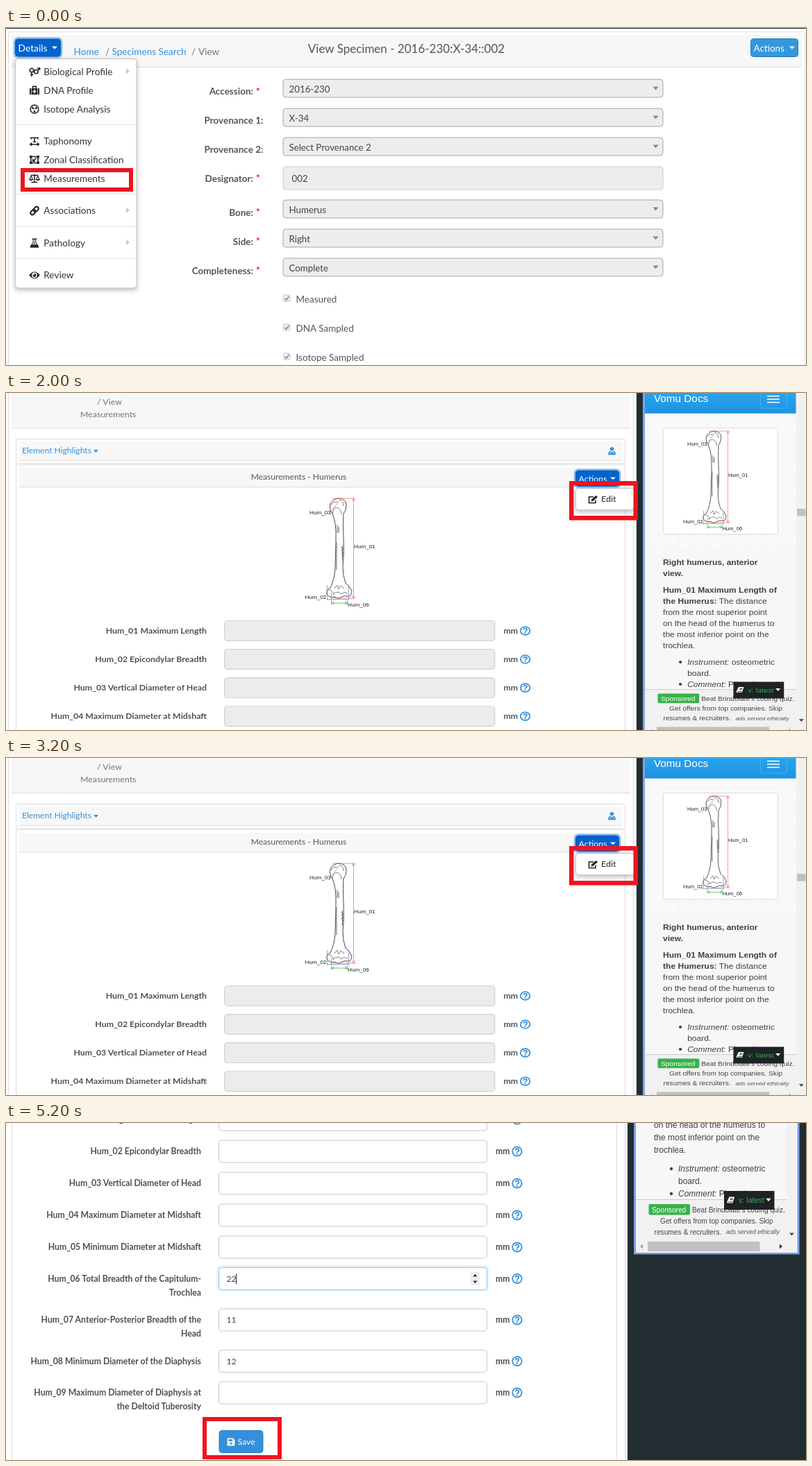
An HTML page for the animation above (6000 ms loop, 1152 by 486 pixels).

```html
<!DOCTYPE html>
<html lang="en">
<head>
<meta charset="utf-8">
<title>Specimen measurements</title>
<style>
  html, body { margin: 0; width: 100%; height: 100%; overflow: hidden; background: #fff; }
  svg { display: block; width: 1152px; height: 486px; font-family: Lato, sans-serif; }
  text { white-space: pre; }
  .arial { font-family: "Liberation Sans", Arial, sans-serif; }
</style>
</head>
<body>
<svg id="stage" viewBox="0 0 1152 486"></svg>
<script>
const BLUE = '#3490dc', ACTIVE = '#0062cc', RED = '#ed1520', GREY = '#6c757d', INK = '#212529', LINE = '#dcdcdc';
const HEAD = '#f7f7f7';

let squash = 1; // vertical text scale of the scene being built

// Text is placed by the middle of its capitals.
function text(x, y, s, { size = 13.6, fill = '#444', bold, anchor = 'start', italic } = {}) {
  return `<text transform="translate(${x} ${y + size * .355 * squash}) scale(1 ${squash})" font-size="${size}" fill="${fill}"
    text-anchor="${anchor}"${bold ? ' font-weight="700"' : ''}${italic ? ' font-style="italic"' : ''}>${s}</text>`;
}
const rect = (x, y, w, h, fill, stroke = 'none', r = 0, sw = 1) =>
  `<rect x="${x}" y="${y}" width="${w}" height="${h}" rx="${r}" fill="${fill}" stroke="${stroke}" stroke-width="${sw}"/>`;
const path = (d, stroke, sw = 1, fill = 'none') =>
  `<path d="${d}" stroke="${stroke}" stroke-width="${sw}" fill="${fill}"/>`;
const group = (transform, body, attrs = '') => `<g transform="${transform}" ${attrs}>${body}</g>`;
const down = (x, y, w, h, fill) => path(`M${x - w / 2} ${y - h / 2}h${w}l${-w / 2} ${h}z`, 'none', 0, fill);
const right = (x, y, w, h, fill) => path(`M${x - w / 2} ${y - h / 2}v${h}l${w} ${-h / 2}z`, 'none', 0, fill);
const highlight = (x, y, w, h, sw) => rect(x + sw / 2, y + sw / 2, w - sw, h - sw, 'none', RED, 0, sw);
const shadowBox = (x, y, w, h) =>
  rect(x - 1, y + 1, w + 2, h + 3, 'rgba(0,0,0,.22)', 'none', 5).replace('/>', ' filter="url(#soft)"/>') +
  rect(x, y, w, h, '#fff', '#c4c4c4', 4);

function button(x, y, w, h, label, size, active) {
  const ring = active ? rect(x - 1, y - 1, w + 2, h + 2, 'none', '#8dbcee', 5, 2.5) : '';
  return ring + rect(x + .5, y + .5, w - 1, h - 1, active ? ACTIVE : '#3498db', active ? '#005cbf' : '#2680bf', 4) +
    text(x + 4.5, y + h / 2 + .3, label, { size, fill: '#fff' }) + down(x + w - 9, y + h / 2, 8, 4 * squash, '#fff');
}

const solid = 'fill="currentColor" stroke="none"';
const icons = {
  sexes: '<circle cx="-4" cy="-2" r="2.7"/><circle cx="2.4" cy="0" r="2.7"/><path d="M-4 1v6M-6.3 4.3h4.6M4.3 -2l3 -3M4.3 -5.2h3.2v3.2"/>',
  medkit: `<path ${solid} d="M-7 -3h2v9h-2zM5 -3h2v9h-2zM-4.3 -3h8.6v9h-8.6z"/><path d="M-2.5 -3v-2.6h5v2.6"/><path stroke="#fff" d="M0 -1.2v5.4M-2.7 1.5h5.4"/>`,
  atom: `<circle r="5.9" stroke-width="1.5"/><path ${solid} d="M0 0l-4.6 -.5l2 -3.6zM0 0l4.6 -.5l-2 -3.6zM0 1l2 3.6h-4z"/>`,
  textWidth: '<path d="M-5 -3v-2.2h10v2.2M0 -5v5.5M-2 .7h4M-6 4.2h12M-4 2.2l-2.3 2l2.3 2M4 2.2l2.3 2l-2.3 2"/>',
  region: `<path d="M-5 -4.5h10v9h-10zM-2.5 2.5l5 -5"/><path ${solid} d="M-7 -6h3.5v3.5h-3.5zM3.5 -6h3.5v3.5h-3.5zM-7 2.5h3.5v3.5h-3.5zM3.5 2.5h3.5v3.5h-3.5zM-3 3v-5l5 5z"/>`,
  scales: `<path d="M0 -6v11.5M-4.5 5.6h9M-5.5 -4.5h11" stroke-width="1.5"/><path d="M-7.2 1.5l2.4 -5l2.4 5zM2.4 1.5l2.4 -5l2.4 5z" stroke-width="1.1"/><path ${solid} d="M-8 1.3h6.4q-3.2 4 -6.4 0zM1.6 1.3h6.4q-3.2 4 -6.4 0z"/>`,
  link: '<g transform="rotate(-45)" stroke-width="2"><rect x="-7" y="-2.6" width="8" height="5.2" rx="2.6"/><rect x="-1" y="-2.6" width="8" height="5.2" rx="2.6"/></g>',
  flask: `<path ${solid} d="M-3.4 -6.6h6.8v1.6h-1v4l3.7 5.8q.8 2 -1.2 2h-9.8q-2 0 -1.2 -2l3.7 -5.8v-4h-1z"/><path stroke="#fff" stroke-width="1.1" d="M-.9 -5v4.4l-1.4 2.3h4.6l-1.4 -2.3v-4.4"/>`,
  eye: `<path ${solid} d="M-7.7 0q7.7 -10 15.4 0q-7.7 10 -15.4 0z"/><circle r="3.2" stroke="#fff" stroke-width="1.4"/><circle cx="-1" cy="-1" r="1" fill="#fff" stroke="none"/>`,
  edit: `<path d="M1 -4h-6.5v9.5h9.5v-4.5"/><path ${solid} d="M-2.5 3l.6 -3l6.5 -6.3l2.4 2.4l-6.5 6.3z"/>`,
  doctor: `<circle cy="-3.4" r="3" ${solid}/><path ${solid} d="M-5.5 6.5v-3q.5 -3 3.5 -3.2l2 2l2 -2q3 .2 3.5 3.2v3z"/><path stroke="#fff" stroke-width="1" d="M-2.5 2v3M2.5 2v2.5"/>`,
  save: `<path ${solid} d="M-6 -6h9l3 3v9h-12z"/><path stroke="none" fill="${BLUE}" d="M-4 -4.3h6.5v3h-6.5z"/><circle cy="2.4" r="1.8" stroke="none" fill="${BLUE}"/>`,
  book: `<path ${solid} d="M-2.5 -5h7.5l-2.6 9h-7.4q-1 -1 -.6 -2z"/><path stroke="#1f2226" stroke-width="1" d="M-1 -2.6h4M-1.6 -.8h4M-4 2.5h6.4"/>`
};
const icon = (name, x, y, color = INK, k = 1) =>
  group(`translate(${x} ${y}) scale(${k} ${k * squash})`, icons[name], `color="${color}" fill="none" stroke="currentColor" stroke-width="1.6"`);

function detailsScene() {
  squash = 1;
  const menu = [
    ['sexes', 'Biological Profile', 63, 1], ['medkit', 'DNA Profile', 90], ['atom', 'Isotope Analysis', 117],
    ['textWidth', 'Taphonomy', 163.5], ['region', 'Zonal Classification', 190], ['scales', 'Measurements', 217],
    ['link', 'Associations', 263.5, 1], ['flask', 'Pathology', 310, 1], ['eye', 'Review', 356.5]
  ];
  const fields = [
    ['Accession:', '2016-230', 87, 1], ['Provenance 1:', 'X-34', 129], ['Provenance 2:', 'Select Provenance 2', 171],
    ['Designator:', '002', 216.5, 1], ['Bone:', 'Humerus', 261, 1], ['Side:', 'Right', 303, 1], ['Completeness:', 'Complete', 345, 1]
  ];
  let s = rect(0, 0, 1152, 486, '#fff') + rect(0, 0, 1152, 1, '#22262b') +
    rect(3.5, 5.5, 1147, 500, '#fff', LINE, 3) + rect(8, 10, 1138, 46, HEAD) + rect(8, 56, 1138, 1, LINE) +
    text(97.5, 34, 'Home', { fill: BLUE }) + text(143, 34, '/', { fill: GREY }) +
    text(152.5, 34, 'Specimens Search', { fill: BLUE }) + text(267, 34, '/', { fill: GREY }) +
    text(277, 34, 'View', { fill: GREY }) +
    text(576.5, 29.8, 'View Specimen - 2016-230:X-34::002', { size: 17, fill: '#555', anchor: 'middle' }) +
    button(1072, 15, 69, 27, 'Actions', 13.4);

  for (const [label, value, y, required] of fields) {
    const plain = label === 'Designator:', h = plain ? 33 : 26;
    s += text(required ? 356 : 370.5, plain ? 217 : y + (y > 250 ? 5 : 4), label, { size: 13.5, fill: '#555', bold: 1, anchor: 'end' }) +
      (required ? text(360, y + (plain ? 0 : 4.5), '*', { fill: '#f00', bold: 1 }) : '') +
      rect(399, y - h / 2, 547, h, '#ededed', plain ? '#ccc' : '#a6a6a6', 4) +
      text(plain ? 411.5 : 407.5, y + 1, value, { size: 13.3 }) + (plain ? '' : down(935.5, y, 8, 5, '#888'));
  }
  ['Measured', 'DNA Sampled', 'Isotope Sampled'].forEach((label, i) => {
    const y = 390 + i * 42;
    s += rect(399.5, y - 5, 9.5, 9.5, '#efefef', '#c6c6c6', 1.5) + path(`M401.5 ${y}l2 2.2l4 -5`, '#8c8c8c', 1.8) +
      text(417.5, y + 1.7, label, { size: 13.5, fill: '#555' });
  });

  s += shadowBox(13.5, 44.5, 174.5, 330.5) + button(13, 15.5, 66, 26, 'Details', 13.8, true);
  for (const y of [139, 239, 286, 332]) s += rect(14, y, 174, 1, '#e4e6e8');
  for (const [name, label, y, more] of menu)
    s += icon(name, 41, y) + text(54.3, y, label, { fill: '#333' }) + (more ? right(175.5, y - .8, 5, 9, '#ccc') : '');
  return s + highlight(21, 202, 162, 34, 6);
}

// Measurement rows, shared by the two form scenes.
const rows = [
  [-5, 'Hum_01 Maximum Length'], [41, 'Hum_02 Epicondylar Breadth'], [87, 'Hum_03 Vertical Diameter of Head'],
  [133, 'Hum_04 Maximum Diameter at Midshaft'], [179, 'Hum_05 Minimum Diameter at Midshaft'],
  [224.5, 'Hum_06 Total Breadth of the Capitulum-', 'Trochlea', 22],
  [284, 'Hum_07 Anterior-Posterior Breadth of the', 'Head', 11],
  [343.5, 'Hum_08 Minimum Diameter of the Diaphysis', '', 12],
  [389, 'Hum_09 Maximum Diameter of Diaphysis at', 'the Deltoid Tuberosity']
];
function form(editing) {
  const label = { size: 12.25, fill: '#4c5157', bold: 1, anchor: 'end' };
  return rows.map(([y, first, second, value]) => {
    const focused = editing && value === 22;
    return text(281, y, first, label) + (second ? text(281, y + 20, second, label) : '') +
      (focused ? rect(305, y - 18, 389, 35, 'none', '#e4f2fb', 5, 3) : '') +
      rect(306.5, y - 16, 386, 32, editing ? '#fff' : '#ececec', focused ? '#8ec6ea' : '#c8c8c8', 4) +
      (editing && value ? text(317.5, y, value, { size: 12.25 }) : '') +
      (focused ? rect(331, y - 7, 1, 15, '#222') + rect(669, y - 10, 13, 20, '#efefef') +
        down(675.5, y + 5, 6, 4, '#333') + path(`M672.5 ${y - 3}h6l-3 -4z`, 'none', 0, '#333') : '') +
      text(705, y, 'mm', { size: 12.25, fill: '#4c5157', bold: 1 }) +
      `<circle cx="736" cy="${y}" r="6.7" fill="none" stroke="${BLUE}" stroke-width="1.8"/>` +
      path(`M733.7 ${y - 1.6}q.3 -2.2 2.4 -2.2q2.300 .1 2.300 2q0 1.300 -1.500 2q-.9 .5 -.9 1.500`, BLUE, 1.8) +
      `<circle cx="736" cy="${y + 3.7}" r="1.15" fill="${BLUE}"/>`;
  }).join('');
}

// Help window at the right with its advert and scroll bars.
function helpPanel() {
  const body = (x, y, s, o) => text(x, y, s, { size: 12, fill: '#404040', ...o });
  const strong = s => `<tspan font-weight="700">${s}</tspan>`, em = s => `<tspan font-style="italic">${s}</tspan>`;
  const lines = [
    [-96, strong('Right humerus, anterior')], [-78, strong('view.')], [-51, strong('Hum_01 Maximum Length of')],
    [-33, strong('the Humerus:') + ' The distance'], [-15, 'from the most superior point'],
    [3, 'on the head of the humerus to'], [21, 'the most inferior point on the'], [39, 'trochlea.']
  ];
  const ad = { size: 10.2, fill: '#444' };
  return rect(895, -400, 300, 1000, '#222d32') + rect(905.5, -400, 235.5, 588, '#f7f7f7', '#7c9fe6', 0, 3) +
    lines.map(([y, s]) => body(933, y, s)).join('') +
    [66, 102].map(y => `<circle cx="958" cy="${y}" r="2.2" fill="#404040"/>`).join('') +
    body(968, 66, em('Instrument:') + ' osteometric') + body(968, 84, 'board.') + body(968, 102, em('Comment:') + ' Place the') +
    rect(907, 110, 217, 59, '#f1f1f1') + rect(907, 110, 217, 1, '#c9c9c9') +
    rect(925.5, 117, 59.5, 15.5, '#37b24a', 'none', 2) + text(930, 125, 'Sponsored', { ...ad, fill: '#fff' }) +
    text(988, 125, "Beat Brindolate's coding quiz.", ad) + text(942, 141, 'Get offers from top companies. Skip', ad) +
    text(933.5, 157, 'resumes &amp; recruiters.', ad) + text(1037, 157, 'ads served ethically', { size: 8.75, fill: '#555', italic: 1 }) +
    rect(1034, 98, 72.5, 27, '#1f2226') + icon('book', 1044, 111.5, '#fff') +
    text(1055, 111.5, 'v: latest', { size: 10.7, fill: '#2fae4e' }) + down(1098, 111, 7, 4.5, '#fff') +
    rect(1124, -400, 15, 569, '#f1f1f1') + down(1131.5, 160.5, 7, 4, '#444') +
    rect(907, 169, 232, 18, '#f1f1f1') + rect(924, 171, 161.5, 14, '#c1c1c1') +
    right(1116, 178, 4, 7, '#333') + path('M917 174.5v7l-4 -3.5z', 'none', 0, '#a3a3a3');
}

function bone() {
  const name = (x, y, s) => text(x, y, s, { size: 8.2, fill: '#222' });
  return path('M470 174q-5 -6 -3 -14q4 -8 13 -8q10 1 10 10q0 7 -4 12q-1 14 0 34q1 26 -1 42q0 14 4 24q7 5 9 12q-1 8 -6 7q-5 -1 -8 1q-6 4 -10 0q-8 2 -12 -4q-1 -7 5 -9q6 -12 7 -28l1 -40q1 -26 -5 -39z', '#333', .9, '#fff') +
    path('M470 174q1 -9 7 -9q6 3 6 10M468 161q4 -5 9 -4M480 154q6 2 6 9M464 284q6 -1 8 7M473 282l4 -5l2 6l3 -5l5 4M471 290q7 -6 12 0q5 -5 9 0', '#444', .7) +
    path('M477 190v11M479 193v9M483 222l3 4M483 226l3 5M483 231l3 4M484.500 220v22M476 215v40', '#555', .9) +
    path('M468 171l13 -17M470 152h33M500.500 152v144M470 296h34M498.500 156l2 -4l2 4M498.500 292l2 4l2 -4', '#f0655c', .7) +
    path('M462.500 277v22M493.500 277v22M462 297.500h31', '#5f61d0', .6) +
    path('M468.500 288v17M491.500 299v6M469 303h22M472 301l-3 2l3 2M488 301l3 2l-3 2', '#45c552', .9) +
    `<g class="arial">${name(437, 172, 'Hum_03')}${name(501, 221, 'Hum_01')}${name(430.5, 294.5, 'Hum_02')}${name(492, 305.5, 'Hum_06')}</g>`;
}

function measurementsScene() {
  squash = 1;
  const fields = group('matrix(1.008 0 0 .893 5.8 347.4)', form(false));
  const help = group('matrix(1.004 0 0 .89 9.3 329.3)', helpPanel(), 'class="arial"');
  squash = .92;
  let grid = '';
  for (let x = 929; x < 1138; x += 20) grid += `M${x}.5 30V222`;
  for (let y = 43; y < 222; y += 18) grid += `M920 ${y}.5H1138`;
  return rect(0, 0, 1152, 486, '#fff') + rect(3, 0, 1, 486, LINE) + rect(903, 0, 1, 486, LINE) +
    rect(8, 0, 891, 50, HEAD) + rect(8, 50, 891, 1, LINE) +
    text(131, 13, '/ View', { size: 12.4, fill: GREY }) + text(107, 31, 'Measurements', { size: 12.4, fill: GREY }) +
    rect(14.5, 66.5, 877, 35, '#fff', LINE, 2) + rect(19, 70, 868, 27, HEAD) + rect(19, 97, 868, 1, LINE) +
    text(23, 83.5, 'Element Highlights', { size: 12.1, fill: BLUE }) + down(129.5, 84, 7, 4, BLUE) + icon('doctor', 872.5, 83.5, BLUE, .95) +
    rect(14.5, 103.5, 877, 420, '#fff', LINE, 2) + rect(19, 108, 868, 27, HEAD) + rect(19, 135, 868, 1, LINE) +
    text(421.5, 121, 'Measurements - Humerus', { size: 12.1, fill: '#555', anchor: 'middle' }) +
    bone() + fields + help +
    `<g class="arial">${rect(920, 30, 218, 192, '#f9f9f9') + path(grid, '#f3f3f3') +
      rect(946.5, 50.5, 165, 153, '#fff', '#dcdcdc', 3) +
      rect(920, 0, 217.5, 29.5, 'url(#bar)') + text(933, 8.5, 'Vomu Docs', { size: 15.3, fill: '#fff' }) +
      rect(1086.5, -8, 38, 30, 'none', '#4db2ef', 3) + path('M1096 4.500h18M1096 9h18M1096 13.500h18', '#fff', 1.6) +
      rect(1139, 167, 12.5, 10.5, '#c1c1c1')}</g>` +
    group('translate(579 -84.400) scale(.92 .917)', bone()) +
    shadowBox(820.5, 137.5, 84, 31) + button(820, 111.5, 63, 23.5, 'Actions', 12.4, true) +
    icon('edit', 845, 153.5) + text(857, 153, 'Edit', { size: 12.6, fill: INK }) + highlight(811, 127, 99, 56.5, 6.5);
}

function saveScene() {
  squash = 1;
  return rect(0, 0, 1152, 486, '#fff') + rect(8, 0, 1, 486, LINE) + rect(879, 0, 1, 486, LINE) + rect(891, 0, 1, 486, LINE) +
    form(true) + `<g class="arial">${helpPanel()}</g>` +
    rect(307, 443.5, 63, 32, BLUE, '#2a7fc4', 4) + icon('save', 324, 460, '#fff', .9) +
    text(333.5, 460, 'Save', { size: 12.3, fill: '#fff' }) + highlight(283, 424, 114, 61, 6);
}

const stage = document.getElementById('stage');
const scenes = [detailsScene, measurementsScene, saveScene];
stage.innerHTML = `<defs><filter id="soft" x="-20%" y="-20%" width="140%" height="150%"><feGaussianBlur stdDeviation="3"/></filter>
  <linearGradient id="bar" x2="0" y2="1"><stop stop-color="#2ba3ee"/><stop offset="1" stop-color="#1b93e0"/></linearGradient></defs>` +
  scenes.map(scene => `<g class="scene">${scene()}</g>`).join('');

const HOLD = 2000, LOOP = HOLD * scenes.length;
stage.querySelectorAll('.scene').forEach((el, i) => el.animate(
  [{ opacity: 1, offset: 0, easing: 'step-end' }, { opacity: 0, offset: HOLD / LOOP, easing: 'step-end' }, { opacity: 0, offset: 1 }],
  { duration: LOOP, delay: i * HOLD - LOOP, iterations: Infinity }));
</script>
</body>
</html>
```
